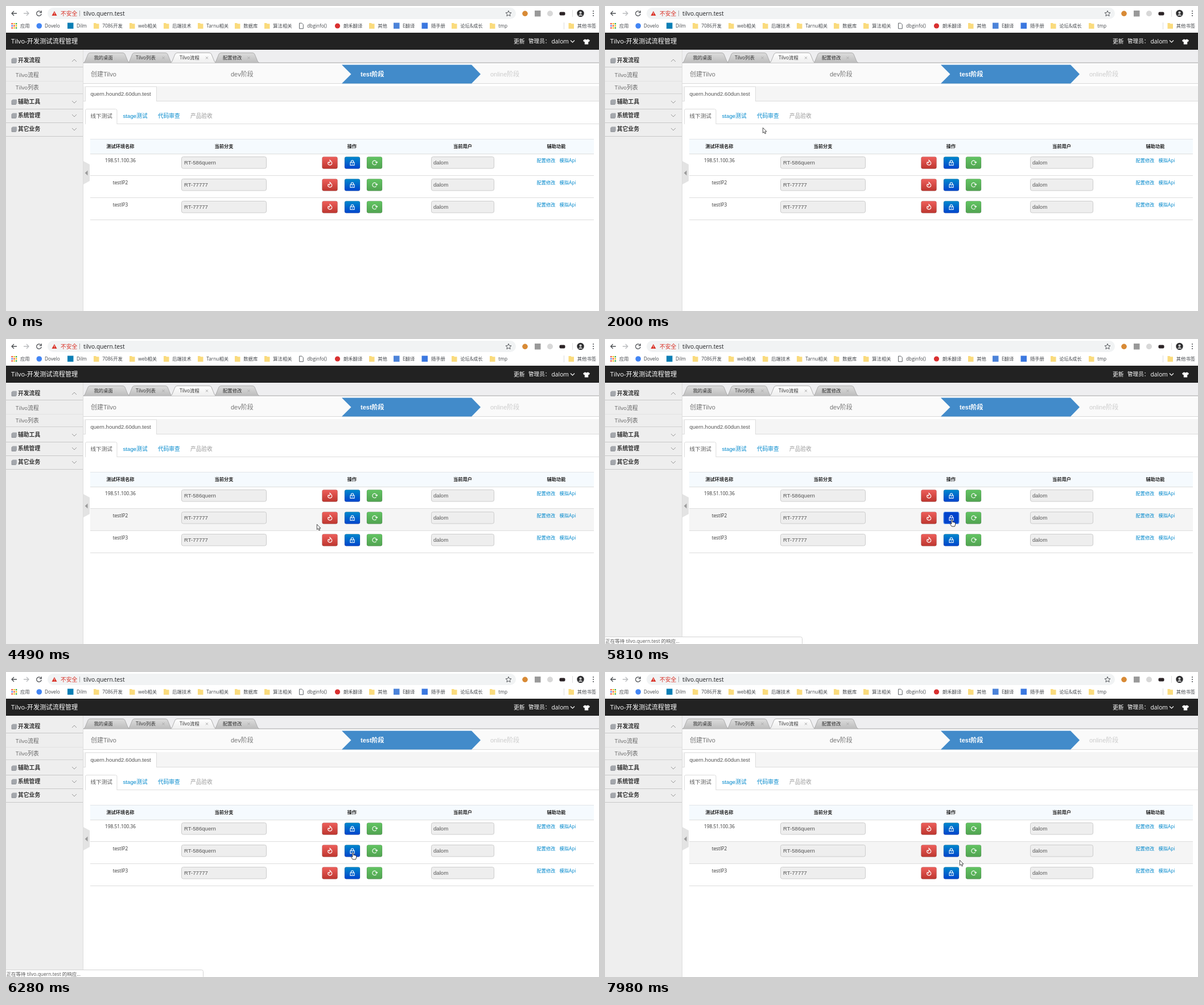
An HTML page for the animation above (8000 ms loop, 1042 px wide and 537 px high).

```html
<!DOCTYPE html>
<html lang="zh">
<head>
<meta charset="utf-8">
<title>Workflow console</title>
<style>
html,body{margin:0;width:100%;height:100%;overflow:hidden;background:#fff}
svg{display:block;width:1042px;height:537px}
text{font-family:"Open Sans","Noto Sans CJK SC","Noto Sans CJK",sans-serif;white-space:pre}
.a{font-family:"Liberation Sans","Noto Sans CJK SC","Noto Sans CJK",sans-serif}
.b{font-weight:bold}
.m{text-anchor:middle}
</style>
</head>
<body>
<svg id="stage" viewBox="0 0 1042 537">
<defs>
<linearGradient id="red" x2="0" y2="1"><stop stop-color="#ee5f5b"/><stop offset="1" stop-color="#bd362f"/></linearGradient>
<linearGradient id="blue" x2="0" y2="1"><stop stop-color="#08c"/><stop offset="1" stop-color="#04c"/></linearGradient>
<linearGradient id="green" x2="0" y2="1"><stop stop-color="#62c462"/><stop offset="1" stop-color="#51a351"/></linearGradient>
<linearGradient id="tab" x2="0" y2="1"><stop stop-color="#dcdcdc"/><stop offset="1" stop-color="#bdbdbd"/></linearGradient>
<linearGradient id="tabOn" x2="0" y2="1"><stop stop-color="#fff"/><stop offset="1" stop-color="#eee"/></linearGradient>
</defs>
</svg>
<script>
const stage = document.getElementById('stage');
const SITE = 'tilvo.quern.test', APP = 'Tilvo', USER = 'dalom';
const BRANCH = 'RT-586quern', OLD_BRANCH = 'RT-77777';
const ROW_Y = 260, ROW_H = 38.75;

// All text is placed by its vertical centre.
const text = (x, y, s, size = 8.3, fill = '#333', cls = '', attr = '') =>
  `<text x="${x}" y="${y + size * .36}" font-size="${size}" fill="${fill}" class="${cls}" ${attr}>${s}</text>`;
const rect = (x, y, w, h, fill, attr = '') =>
  `<rect x="${x}" y="${y}" width="${w}" height="${h}" fill="${fill}" ${attr}/>`;
const dot = (x, y, r, fill) => `<circle cx="${x}" cy="${y}" r="${r}" fill="${fill}"/>`;
const path = (d, stroke, w = 1, fill = 'none', attr = '') =>
  `<path d="${d}" stroke="${stroke}" stroke-width="${w}" fill="${fill}" ${attr}/>`;
const line = (x, y, w, color) => rect(x, y, w, 1, color);
const square = (x, color) => rect(x, 29.5, 10.5, 10.5, color);

function browser() {
  let s = rect(0, 0, 1042, 47, '#fff') + rect(73, 3, 823, 20, '#f1f3f4', 'rx="10"');
  s += path('M19 13H10M14 9L10 13L14 17', '#4a4d51', 1.3) + path('M31 13H40M36 9L40 13L36 17', '#b8babd', 1.3);
  s += path('M61.3 10.4A4.3 4.3 0 1 0 62.2 14M62.3 8.3V11.7H58.8', '#4a4d51', 1.3);
  s += path('M85 9L89.5 17H80.5Z', 'none', 0, '#d93025') + rect(84.6, 11.5, .9, 2.6, '#fff') + rect(84.6, 14.9, .9, .9, '#fff');
  s += text(96, 13, '不安全', 9.8, '#d93025') + rect(129, 8, 1, 10, '#a9abae') + text(136, 13, SITE, 10.3, '#202124');
  s += path('M883 8.3L884.4 11.6L888 11.9L885.3 14.2L886.1 17.7L883 15.8L879.9 17.7L880.7 14.2L878 11.9L881.6 11.6Z', '#55585c', 1);
  s += dot(912, 13.3, 4.8, '#d88a35') + rect(929, 8, 10.5, 10.5, '#999') + dot(956, 13.3, 5, '#d8d8d8') + rect(972.5, 10.5, 10, 6, '#2b2326', 'rx="2"');
  s += rect(995, 7, 1, 12, '#ddd') + dot(1009.5, 13, 6.2, '#2c2c2e') + dot(1009.5, 11.6, 2.2, '#c9c9c9') + path('M1005.5 17Q1009.5 11.5 1013.5 17Z', 'none', 0, '#c9c9c9');
  for (const y of [9, 13, 17]) s += dot(1032, y, 1.1, '#55585c');

  const hues = ['#ea4335', '#fbbc05', '#34a853', '#4285f4', '#ea4335', '#fbbc05'];
  for (let i = 0; i < 9; i++) s += rect(9.5 + i % 3 * 3.7, 30 + (i / 3 | 0) * 3.7, 2.4, 2.4, hues[i % 6]);
  const folders = [[154, '7086开发'], [217, 'web相关'], [277, '后端技术'], [337, 'Tarnu相关'], [402, '数据库'],
    [454, '算法相关'], [638, '其他'], [783, '论坛&amp;成长'], [850, 'tmp'], [988.5, '其他书签']];
  for (const [x, name] of folders)
    s += path(`M${x} 30H${x + 4}L${x + 5} 31.3H${x + 9.5}V40H${x}Z`, 'none', 0, '#fadb7d') + text(x + 15.3, 35, name, 8.3, '#45484c');
  const marks = [[25, '应用'], [68, 'Dovelo'], [124, 'Dilm'], [529, 'dbginfo()'], [593, '朗禾翻译'], [697, 'E翻译'], [747, '随手册']];
  for (const [x, name] of marks) s += text(x, 35, name, 8.3, '#45484c');
  s += dot(58.3, 35, 4.8, '#4285f4') + square(108, '#0a7fb5') + dot(582.5, 35, 4.6, '#d93030') + square(681, '#4c83d9') + square(730.5, '#3b78e0');
  s += path('M515.5 30.2H519.8L522.3 32.7V39.8H515.5Z', '#5f6368', 1) + rect(980, 29, 1, 12, '#ddd');
  return s;
}

function header() {
  return rect(0, 47, 1042, 30, '#222') + text(9, 62, APP + '-开发测试流程管理', 11.2, '#fff') +
    text(892, 62, '更新', 9.8, '#fff') + text(918, 62, '管理员：', 9.6, '#fff') + text(958.5, 62, USER, 10.3, '#fff') +
    path('M992 60.5L995.5 64L999 60.5', '#fff', 1.1) +
    path('M1014 60.5L1017.5 58.3Q1020 60.4 1022.5 58.3L1026 60.5L1024.5 63.3L1023.2 62.7V67.5H1016.8V62.7L1015.5 63.3Z', 'none', 0, '#fff');
}

function sidebar() {
  let s = rect(0, 77, 135, 460, '#eee') + rect(135, 77, 1, 460, '#ddd');
  [['开发流程', 96], ['辅助工具', 169], ['系统管理', 193], ['其它业务', 217]].forEach(([name, y], i) => {
    s += rect(9.5, y - 3.5, 8.5, 8.5, '#999ca1', 'rx="1.5"') + rect(11, y - 4.5, 8, 8, '#a4a7ac', 'rx="1"');
    s += text(21, y - .4, name, 9.8, '#333', 'b');
    const d = i ? 2 : -2;
    s += path(`M116 ${y - d}L120 ${y + d}L124 ${y - d}`, '#999', 1);
    s += line(0, i ? y + 12 : 107, 135, '#c8c8c8');
  });
  s += text(17, 121, APP + '流程', 9.8, '#666') + text(17, 143.5, APP + '列表', 9.8, '#666');
  return s + line(0, 132, 135, '#e2e2e2') + line(0, 154, 135, '#d0d0d0');
}

function pageTabs() {
  let s = rect(136, 77, 906, 24, '#eeeef0') + line(136, 99.5, 906, '#aaa');
  const tab = (x, w, name, tx, on) =>
    path(`M${x} 100Q${x + 2} 99.5 ${x + 3} 97L${x + 8} 85Q${x + 9} 82.5 ${x + 12} 82.5H${x + w - 10}Q${x + w - 7} 82.5 ${x + w - 6} 85L${x + w - 1} 97Q${x + w} 99.5 ${x + w + 2} 100`,
      '#a8a8a8', .9, on ? 'url(#tabOn)' : 'url(#tab)') + text(tx, 91, name, 8.4, '#333');
  s += tab(366, 77, '配置修改', 381) + tab(214, 76, APP + '列表', 228) + tab(136, 79, '我的桌面', 154.5) + tab(289, 78, APP + '流程', 305, true);
  for (const x of [276.5, 353, 426.5]) s += path(`M${x - 2} 89.3L${x + 2} 93.3M${x + 2} 89.3L${x - 2} 93.3`, '#aaa', 1);
  return s;
}

const COLUMNS = [[201, '测试环境名称'], [383, '当前分支'], [608, '操作'], [802.5, '当前用户'], [967, '辅助功能']];
const BUTTONS = [[555, 'red', '#bd362f'], [594.5, 'blue', '#04c'], [633.5, 'green', '#51a351']];
const FIELDS = [[308, 150], [747, 111]];

function content() {
  let s = rect(136, 101, 906, 436, '#fff');
  s += rect(136, 103, 906, 33, '#fafafa') + line(136, 136, 906, '#d8d8d8');
  s += path('M590 103.5H818L834 120L818 136.5H590L606.5 120Z', 'none', 0, '#428bca');
  s += text(149, 120, '创建' + APP, 11, '#777', 'a') + text(395, 120, 'dev阶段', 11, '#777', 'a') +
    text(623, 120, 'test阶段', 11, '#fff', 'a b') + text(851, 120, 'online阶段', 11, '#ccc', 'a');
  s += rect(136, 141, 906, 26, '#f5f5f5') + line(136, 167, 906, '#ddd');
  s += path('M139.5 168V142H264.5V168', '#ddd', 1, '#fff') + text(148.5, 155, 'quern.hound2.60dun.test', 9.55, '#555', 'a');
  s += line(140, 207, 902, '#ddd') + path('M139.5 208V184Q139.5 181.5 142 181.5H192.5Q195 181.5 195 184V208', '#ddd', 1, '#fff');
  s += text(148.5, 194, '线下测试', 9.6, '#555') + text(205.5, 194, 'stage测试', 9.7, '#08c', 'a') +
    text(267, 194, '代码审查', 9.7, '#08c') + text(324, 194, '产品验收', 9.7, '#999');
  s += rect(148, 234, 885, 26, '#f5fafe') + line(148, 234, 885, '#e2e5e8');
  for (const [x, name] of COLUMNS) s += text(x, 247, name, 8.2, '#222', 'b m');

  ['198.51.100.36', 'testIP2', 'testIP3'].forEach((host, i) => {
    const y = ROW_Y + i * ROW_H, t = Math.round(y + 5), c = t + 10.8;
    s += rect(148, y, 885, ROW_H, '#f5f5f5', `id="row${i}" visibility="hidden"`);
    s += line(148, Math.floor(y), 885, '#ddd') + text(201, y + 12.2, host, 8.3, '#333', 'm');
    for (const [x, w] of FIELDS) s += rect(x + .5, t + .5, w - 1, 20.5, '#eee', 'stroke="#ccc" rx="3"');
    s += text(313, t + 10.7, i ? OLD_BRANCH : BRANCH, 9.6, '#555', 'a', `id="branch${i}"`) + text(751, t + 10.7, USER, 9.6, '#555', 'a');
    BUTTONS.forEach(([x, name], j) =>
      s += rect(x + .5, t + .5, 27, 21, `url(#${name})`, `id="btn${i}${j}" rx="3" stroke="#000" stroke-opacity=".13"`));
    s += path(`M569.2 ${c - 4.3}Q574 ${c - .3} 572.4 ${c + 2.7}Q569.2 ${c + 6} 566 ${c + 2.7}Q565 ${c} 566.7 ${c - 1}L568 ${c + .5}Q570 ${c - 1.3} 569.2 ${c - 4.3}Z`, '#fff', 1.1);
    s += rect(605, c - .4, 7, 5, 'none', 'stroke="#fff" stroke-width="1.1"') + rect(607.9, c + 1.3, 1.3, 1.6, '#fff') +
      path(`M606.4 ${c - .4}V${c - 2}A2.1 2.1 0 0 1 610.6 ${c - 2}V${c - .4}`, '#fff', 1.1);
    s += path(`M650.6 ${c + 2.6}A3.8 3.8 0 1 1 651.4 ${c - .5}M653 ${c - 1.5}L651.3 ${c + .6}L649.2 ${c - 1}`, '#fff', 1.1);
    s += text(932.5, y + 12.2, '配置修改', 8.2, '#08c') + text(972.5, y + 12.2, '模拟Api', 8.3, '#08c');
  });
  return s + line(148, 376, 885, '#ddd') +
    rect(595, 304.5, 27, 21, 'none', 'id="focus" stroke="#6ea3f5" stroke-width="1.2" rx="3" visibility="hidden"');
}

const handle = path('M136 273L147 279V308L136 314Z', 'none', 0, '#e3e3e3') + path('M143.5 289.5V298.5L138.8 294Z', 'none', 0, '#999');
const overlay = `<g id="status">${rect(-2, 524.5, 348.5, 15, '#fff', 'stroke="#d4d4d4" rx="3"')}<g id="statusText">${text(.5, 532, '', 8.5, '#555')}</g></g>
<g id="cursor">
<g id="arrow">${path('M.4 .3V9.5L2.5 7.6L4 11L5.6 10.3L4.2 7.1H7Z', '#222', .8, '#fff')}</g>
<g id="hand">${path('M-1.2 6V1Q-.2 -.6 .8 1V5Q1.8 4.2 2.5 5.2Q3.6 4.6 4.1 5.7Q5.6 5.4 5.6 7V9.5L4.4 12.5H-.7L-3.2 9Q-3.9 7.2 -2.4 7.3L-1.2 8.3Z', '#222', .9, '#fff')}</g>
<g id="beam">${path('M-2.5 -5Q0 -5 0 -4Q0 -5 2.5 -5M0 -4V4M-2.5 5Q0 5 0 4Q0 5 2.5 5', '#333', .9)}</g>
</g>`;

stage.insertAdjacentHTML('beforeend', browser() + header() + sidebar() + pageTabs() +
  `<g id="content">${content()}</g>` + rect(136, 101, 906, 436, '#fff', 'id="blank"') + handle + overlay);

// Pointer moves: start, end, steps, target x and y, optional bend point.
const MOVES = [
  [450, 450, 1, 715, 453], [530, 1230, 10, 677, 128, 700, 52],
  [1310, 2000, 10, 277, 214, 400, 272], [2090, 2090, 1, 273, 211],
  [2240, 2470, 4, 171, 192], [2640, 3330, 10, 206, 321, 168, 250],
  [3560, 3560, 1, 206, 320], [3710, 4110, 6, 414, 325, 310, 303],
  [4260, 4490, 4, 546, 326], [4570, 4650, 2, 617, 325.8],
  [4800, 4960, 3, 610, 320], [5120, 5350, 4, 610, 317.5],
  [6510, 7280, 11, 350, 311, 470, 312], [7350, 7350, 1, 347, 314],
  [7520, 7520, 1, 345, 314.5], [7750, 7980, 4, 623, 331]
];

function pointer(t) {
  let x = 715, y = 453;
  for (const [start, end, n, tx, ty, bx = (x + tx) / 2, by = (y + ty) / 2] of MOVES) {
    if (t < start) break;
    const k = n > 1 ? Math.min(n - 1, Math.floor((t - start) / (end - start) * (n - 1) + .1)) : 0;
    const u = (k + 1) / n, v = 1 - u;
    x = v * v * x + 2 * u * v * bx + u * u * tx;
    y = v * v * y + 2 * u * v * by + u * u * ty;
  }
  return [x, y];
}

const el = id => document.getElementById(id);
const show = (id, on) => el(id).setAttribute('visibility', on ? 'visible' : 'hidden');
const statusLabel = el('statusText').firstChild;
const ramp = (t, start, step) => t < start ? 0 : t < start + step ? .5 : 1;

function draw(t) {
  const [x, y] = pointer(t);
  const fresh = t >= 6190 && t < 6510;
  const row = x >= 148 && x < 1033 ? Math.floor((y - ROW_Y) / ROW_H) : -1;
  const top = ROW_Y + row * ROW_H + 5;
  const inside = row >= 0 && row < 3 && y >= top && y < top + 21.5;
  const button = inside ? BUTTONS.findIndex(([bx]) => x >= bx && x < bx + 28) : -1;
  const field = inside && FIELDS.some(([fx, w]) => x >= fx && x < fx + w);
  const live = t >= 450 && !fresh;

  for (let i = 0; i < 3; i++) {
    show('row' + i, live && row === i);
    BUTTONS.forEach(([, name, dark], j) =>
      el('btn' + i + j).setAttribute('fill', live && row === i && button === j ? dark : `url(#${name})`));
  }
  show('focus', t >= 5200 && t < 6190);
  show('blank', t >= 6190 && t < 6280);
  el('branch1').textContent = t >= 6280 ? BRANCH : OLD_BRANCH;

  const link = ramp(t, 2640, 70) - ramp(t, 2950, 80);
  const wait = ramp(t, 5730, 80) - ramp(t, 6590, 80);
  el('status').setAttribute('opacity', Math.max(link, wait));
  statusLabel.textContent = t < 5000 ? SITE + '/#' : `正在等待 ${SITE} 的响应...`;

  el('cursor').setAttribute('transform', `translate(${x} ${y})`);
  show('arrow', t >= 450 && button < 0 && !field);
  show('hand', t >= 450 && button >= 0);
  show('beam', t >= 450 && field);
}

function tick() {
  draw(performance.now() % 8000);
  requestAnimationFrame(tick);
}
tick();
</script>
</body>
</html>
```
